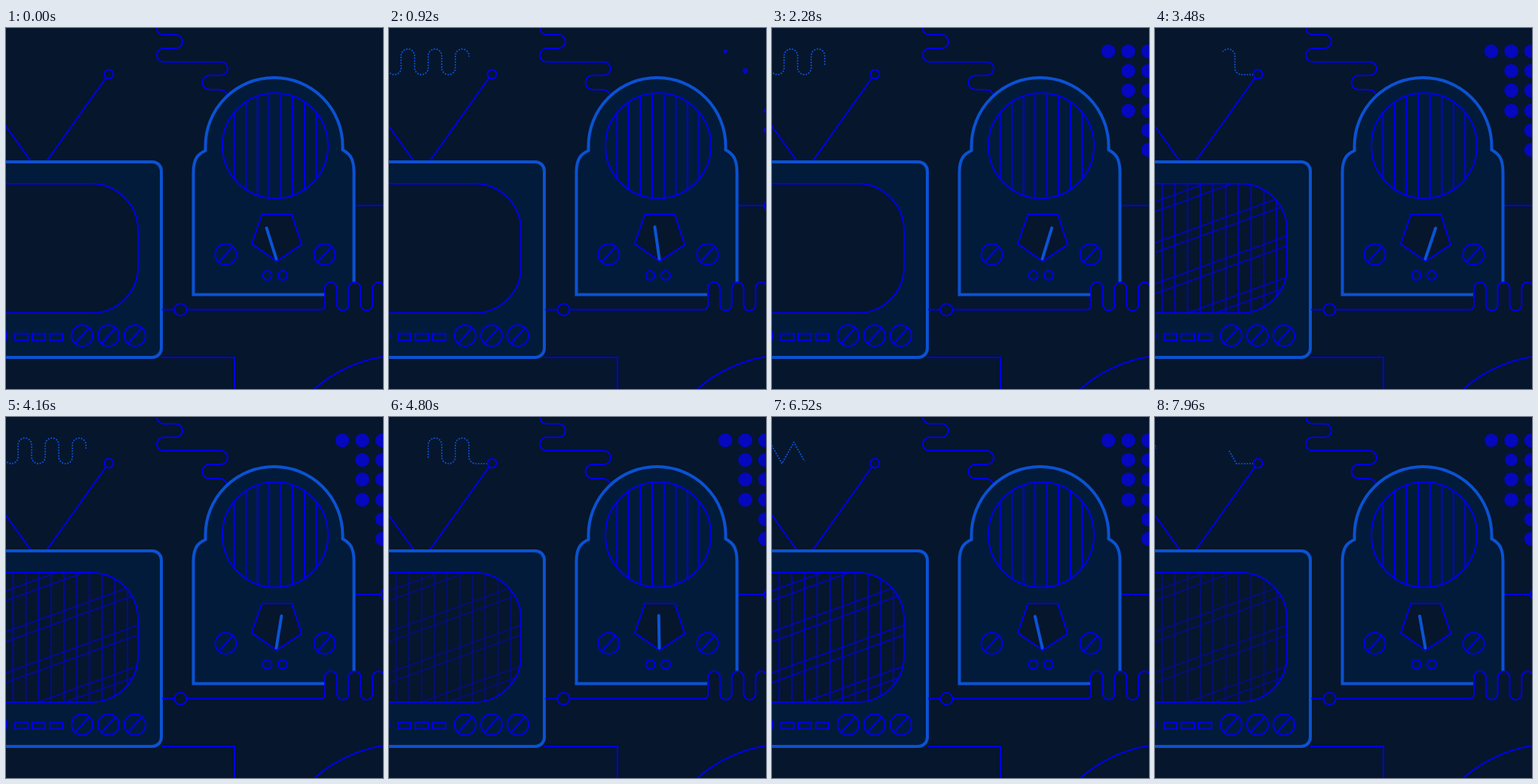
These frames come from a looping animation (500 px wide and 480 px high, 8 s). An HTML page:

```html
<!DOCTYPE html>
<html lang="en">
<head>
<meta charset="utf-8">
<title>Radio and television</title>
<style>
  html, body { margin: 0; width: 100%; height: 100%; overflow: hidden; background: #06162d; }
  svg { display: block; width: 500px; height: 480px; }
  .line { fill: none; stroke: #0000f0; stroke-width: 2; }
  .case { fill: #031b3a; stroke: #0b52d2; stroke-width: 4; }
  .hole { fill: #06162d; stroke: #0000f0; stroke-width: 2; }
  .dots { fill: none; stroke: #0b50cc; stroke-width: 2.1; stroke-linecap: round; stroke-dasharray: .1 3.6; }
  .trim { fill: none; stroke: #fff; stroke-width: 8; }
</style>
</head>
<body>
<svg id="stage" viewBox="0 0 500 480">
  <defs>
    <clipPath id="screenClip"><path d="M-10 207H113A62 62 0 0 1 175 269V318A62 61 0 0 1 113 379H-10Z"/></clipPath>
    <mask id="curvyMask" maskUnits="userSpaceOnUse" x="0" y="0" width="500" height="480"></mask>
    <mask id="zigzagMask" maskUnits="userSpaceOnUse" x="0" y="0" width="500" height="480"></mask>
  </defs>

  <!-- wires -->
  <g class="line">
    <path d="M200 0A9 9 0 0 0 209 9H225A9 9 0 0 1 225 27H209A9 9 0 0 0 209 45H285A9 9 0 0 1 285 63H270A9.5 9.5 0 0 0 270 82H283Q291 82 294 90"/>
    <path d="M463 236H500M206 438H303V480M409 480Q448 446 500 437"/>
    <path d="M132.500 66.500L54 177M-1 129.500L33 177"/>
    <circle cx="136.500" cy="61.500" r="6"/>
  </g>
  <g id="dots" fill="#0508bd"></g>
  <circle id="plug" class="hole" cy="236" r="8"/>
  <path id="curvy" class="dots" mask="url(#curvyMask)"/>
  <path id="zigzag" class="dots" mask="url(#zigzagMask)"/>

  <!-- television -->
  <rect class="case" x="-60" y="178" width="266" height="260" rx="12"/>
  <path fill="#06162d" d="M-10 207H113A62 62 0 0 1 175 269V318A62 61 0 0 1 113 379H-10Z"/>
  <g clip-path="url(#screenClip)"><path id="noise" class="line"/></g>
  <g class="line">
    <path d="M-10 207H113A62 62 0 0 1 175 269V318A62 61 0 0 1 113 379H-10"/>
    <path d="M12 406.500H29V415H12ZM35 406.500H52V415H35ZM58 406.500H75V415H58Z"/>
    <path d="M207 374.500H223.500M239.500 374.500H417Q423 374.500 423 368"/>
    <circle cx="231.500" cy="374.500" r="8"/>
  </g>

  <!-- radio -->
  <path fill="#031b3a" d="M248.500 354.500V192C248.500 172 256 167 264.500 163V157A91 91 0 0 1 446.500 157V162C455 167 461.500 172 461.500 192V338A7.800 7.800 0 0 0 454.600 346V368A7.900 7.900 0 0 1 438.800 368V346A7.900 7.900 0 0 0 423 346V354.500Z"/>
  <path class="case" style="fill:none" d="M423 354.500H248.500V192C248.500 172 256 167 264.500 163V157A91 91 0 0 1 446.500 157V162C455 167 461.500 172 461.500 192V338"/>
  <path id="coil" class="line"/>
  <circle class="line" cx="357" cy="156.500" r="70"/>
  <path id="grille" class="line"/>
  <path class="hole" d="M339.500 248H379L392 288L359 310L326 287Z"/>
  <g class="line">
    <circle cx="346.500" cy="329" r="6"/>
    <circle cx="367" cy="329" r="6"/>
  </g>
  <g id="knobs" class="line"></g>
  <path id="needle" d="M358.500 307V264" stroke="#0b54d6" stroke-width="4" stroke-linecap="round"/>
</svg>
<script>
const LOOP = 8000, STEP = 40;
const $ = id => document.getElementById(id);
const clamp = (x, a = 0, b = 1) => Math.min(b, Math.max(a, x));
const ramp = (t, from, to) => clamp((t - from) / (to - from));
const smooth = u => u * u * (3 - 2 * u);

function add(parent, tag, attrs) {
  const el = document.createElementNS('http://www.w3.org/2000/svg', tag);
  for (const k in attrs) el.setAttribute(k, attrs[k]);
  return parent.appendChild(el);
}

// Fixed details
for (const [x, y] of [[-13, 409], [101, 409], [136, 409], [171, 409], [291.5, 301], [422.5, 301]]) {
  add($('knobs'), 'circle', { cx: x, cy: y, r: 14 });
  add($('knobs'), 'path', { d: `M${x - 9} ${y + 10}L${x + 9} ${y - 10}` });
}

let d = '';
for (let i = 0; i < 8; i++) {
  const x = 302.5 + i * 15.55, h = Math.sqrt(4900 - (x - 357) ** 2);
  d += `M${x} ${156.5 - h}V${156.5 + h}`;
}
$('grille').setAttribute('d', d);

d = 'M423 369V346';
for (let i = 1; i < 7; i++) {
  const up = i % 2;
  d += `A7.9 7.9 0 0 ${up} ${423 + i * 15.8} ${up ? 346 : 368}V${up ? 368 : 346}`;
}
$('coil').setAttribute('d', d);

d = '';
for (let x = 9.5; x < 175; x += 16.85) d += `M${x} 207V379`;
for (let y = 231; y < 420; y += 54.5) d += `M0 ${y}L180 ${y - 65}M0 ${y + 13}L180 ${y - 52}`;
$('noise').setAttribute('d', d);

// Signals run along a path measured from the antenna tip
d = 'M130 62H115A9 9 0 0 1 106 53';
for (let i = 1; i < 9; i++) {
  const top = i % 2, y = top ? 37 : 53;
  d += `V${y}A9 9 0 0 ${top ? 0 : 1} ${106 - 18 * i} ${y}`;
}
const curvyPath = d;

d = 'M130 62H108';
for (let i = 1; i < 11; i++) d += `L${108 - 15.8 * i} ${i % 2 ? 33.5 : 62}`;
const zigzagPath = d;

// Each pulse: time its front and its tail reach the antenna
const signals = [
  { id: 'curvy', path: curvyPath, speed: .365, pulses: [[1040, 2100], [2611, 3664], [4269, 5293]] },
  { id: 'zigzag', path: zigzagPath, speed: .36, pulses: [[6953, 8077], [8629, 9750]] }
];
for (const s of signals) {
  $(s.id).setAttribute('d', s.path);
  s.trims = s.pulses.map(() => add($(s.id + 'Mask'), 'path', { d: s.path, class: 'trim' }));
}

// Dots: x, y, start of growth
const dots = [
  [446, 31, 700], [472.5, 31, 800], [499, 31, 1000],
  [472.5, 57, 660], [499, 57, 1100],
  [472.5, 83, 960], [499, 83, 1200],
  [472.5, 110, 1060], [499, 110, 700],
  [499, 136, 680], [499, 162, 1000]
].map(([x, y, start]) => ({
  start, end: x < 480 && start < 900 ? start + 7180 : LOOP,
  el: add($('dots'), 'circle', { cx: x, cy: y })
}));

const needle = [[280, -17.5], [920, -8], [2280, 17], [2960, 20], [3480, 18.5],
  [4800, -1], [6520, -13], [7160, -15], [7960, -10]];

// Cubic curve through the keys with flat turning points
function track(keys, t) {
  const n = keys.length - 1;
  if (t <= keys[0][0]) return keys[0][1];
  if (t >= keys[n][0]) return keys[n][1];
  const slope = i => (keys[i + 1][1] - keys[i][1]) / (keys[i + 1][0] - keys[i][0]);
  const tangent = i => {
    if (i === 0 || i === n) return 0;
    const a = slope(i - 1), b = slope(i);
    return a * b > 0 ? 2 * a * b / (a + b) : 0;
  };
  let i = 0;
  while (t > keys[i + 1][0]) i++;
  const [t0, v0] = keys[i], [t1, v1] = keys[i + 1];
  const w = t1 - t0, u = (t - t0) / w;
  return v0 + (v1 - v0) * smooth(u)
    + w * u * (1 - u) * ((1 - u) * tangent(i) - u * tangent(i + 1));
}

function noiseLevel(t) {
  if (t < 2760) return .68 * ramp(t, 2300, 2760);
  const u = clamp(((t - 2760) % 3360 - 860) / 2500);
  return .68 - .3 * Math.sin(Math.PI * u) ** 2;
}

function plugX(t) {
  const u = ((t - 540 + 3100) % 3100);
  const shown = t < 540 ? 0 : smooth(ramp(u, 0, 200)) - smooth(ramp(u, 1440, 1640));
  return 514 - 8.5 * shown;
}

function draw(t) {
  for (const s of signals) {
    s.pulses.forEach(([front, tail], i) => {
      const a = Math.max(0, s.speed * (front - t));
      const b = Math.max(0, s.speed * (tail - t));
      const el = s.trims[i];
      el.style.display = b > a ? '' : 'none';
      el.setAttribute('stroke-dasharray', `0 ${a} ${b - a} 9999`);
    });
  }
  for (const p of dots) {
    const size = smooth(ramp(t, p.start, p.start + 600)) - smooth(ramp(t, p.end, p.end + 600));
    p.el.setAttribute('r', 9.3 * size);
  }
  $('needle').setAttribute('transform', `rotate(${track(needle, t)} 358.5 307)`);
  $('noise').style.opacity = noiseLevel(t);
  $('plug').setAttribute('cx', plugX(t));
}

const begin = performance.now();
function tick() {
  const t = (performance.now() - begin) % LOOP;
  draw(Math.floor(t / STEP) * STEP);
  requestAnimationFrame(tick);
}
tick();
</script>
</body>
</html>
```
